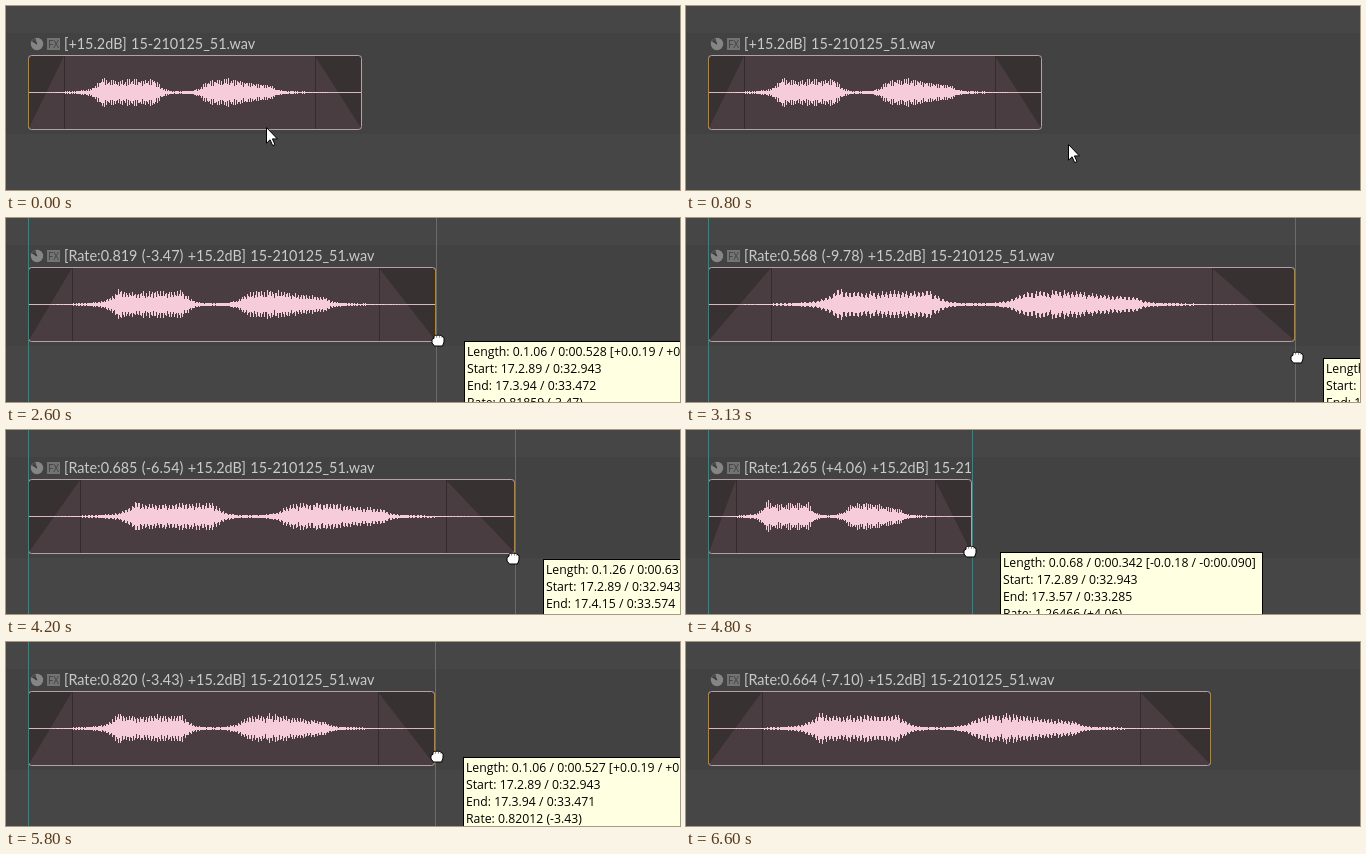
Recreate the animation shown at these times as an HTML page. Size 674x184 px, loop 6.79 s.

```html
<!DOCTYPE html>
<html lang="en">
<head>
<meta charset="utf-8">
<title>Stretching an audio item</title>
<style>
  html, body { margin: 0; width: 100%; height: 100%; overflow: hidden; background: #464646; }
  svg { display: block; width: 674px; height: 184px; }
  .crisp { shape-rendering: crispEdges; }
  #title { font: 14.4px Lato, sans-serif; word-spacing: .7px; fill: #cacaca; }
  #tip text { font: 12.25px "Open Sans", "Noto Sans", sans-serif; fill: #000; white-space: pre; }
  #fx { font: 10px "Open Sans", sans-serif; fill: #414141; }
</style>
</head>
<body>
<svg viewBox="0 0 674 184">
  <defs>
    <clipPath id="inItem"><rect id="clip" x="22" y="28" height="97"/></clipPath>
  </defs>
  <rect width="674" height="184" fill="#464646"/>
  <rect y="27" width="674" height="101" fill="#424242"/>

  <path id="dimGuide" class="crisp" stroke="#6b6b6b"/>

  <g clip-path="url(#inItem)">
    <circle cx="31" cy="38" r="6.2" fill="#858585"/>
    <path d="M31 38L25.6 35.2A6.2 6.2 0 0 1 29.5 32Z" fill="#4a4a4a"/>
    <path d="M31 38L27 35" stroke="#3a3a3a" stroke-width="1.3"/>
    <rect x="41" y="32" width="13" height="12" fill="#737373"/>
    <text id="fx" x="42" y="41.7">FX</text>
    <text id="title" x="58" y="43"></text>
  </g>

  <rect id="body" x="22.5" y="49.5" height="74" rx="3" fill="#493d41"/>
  <path id="fades" fill="#373132"/>
  <path id="fadeLines" class="crisp" stroke="#332c2e"/>
  <path id="axis" class="crisp" stroke="#d9b6c2"/>
  <path id="wave" class="crisp" stroke="#f6cbda"/>
  <rect id="frame" x="22.5" y="49.5" height="74" rx="3" fill="none" stroke="#b3a1a6"/>
  <path class="crisp" stroke="#c08412" d="M22.5 52V122"/>
  <path id="rightEdge" class="crisp" stroke="#c08412"/>

  <path id="guides" class="crisp" stroke="#1a918d"/>

  <g id="tip">
    <rect class="crisp" x=".5" y=".5" fill="#ffffe1" stroke="#000"/>
    <text x="3" y="14.5"></text>
    <text x="3" y="31.5"></text>
    <text x="3" y="48.5"></text>
    <text x="3" y="65.5"></text>
  </g>

  <path id="arrow" fill="#fff" stroke="#000" d="M.5 .5V16.2L4.1 12.8L6.7 18.6L9 17.6L6.4 11.9H11.4Z"/>
  <path id="resize" fill="#fff" stroke="#000" d="M-6 0L-2.5 -4V-1.5H2.5V-4L6 0L2.5 4V1.5H-2.5V4Z"/>
  <g id="fist">
    <path fill="#fff" stroke="#000" d="M-3.5 5.5L-6 2.5V-1L-4 -2.2V-4.2Q-3 -6 -1.4 -4.8Q0 -6.3 1.5 -4.8Q3 -5.8 4 -4.2Q6 -4.2 6 -2V1.5L4.5 5.5Z"/>
    <path fill="none" stroke="#666" stroke-width=".7" d="M-1.4 -4.4V-2.8M1.5 -4.4V-2.8M4 -3.8V-2.4"/>
  </g>
</svg>
<script>
const LOOP = 6790, STEP = 200 / 3;
const LEFT = 22, BASE_W = 333.87, BASE_EDGE = LEFT + BASE_W;
const START = 32.9433, LENGTH = 0.4329;
const GRAB = 1800, RELEASE = 6600, MID = 86.5;

const $ = id => document.getElementById(id);
const set = (id, attrs) => { for (const k in attrs) $(id).setAttribute(k, attrs[k]); };
const show = (id, on) => set(id, { visibility: on ? 'visible' : 'hidden' });
const move = (id, x, y) => set(id, { transform: `translate(${x} ${y})` });

// Keys are [time, value]
const EDGE = [[2267, BASE_EDGE], [3133, 609.26], [3533, 640], [3667, 640], [4200, 509.1],
  [4800, 286], [5133, 236], [5333, 236], [5800, 429.1], [6533, 525.1]];
const HAND_Y = [[2267, 114], [3133, 139], [3533, 140], [3667, 140], [4200, 128],
  [4800, 121], [5133, 118], [5333, 118], [5800, 114], [6533, 114]];
const POINTER_X = [[0, 260], [733, 383], [1333, 356]];
const POINTER_Y = [[0, 121], [733, 139], [1333, 114]];

// Half height of the waveform along the unstretched item
const ENV = [[0, 0], [20, .6], [36, 1.2], [52, 2.2], [62, 4], [68, 9], [75, 18], [81, 12.5],
  [95, 14], [105, 16], [118, 14], [126, 15], [131, 9], [136, 4], [144, 2], [162, 2],
  [170, 4.5], [176, 10], [183, 16], [192, 14], [200, 16], [212, 13.5], [222, 10.5],
  [232, 10], [243, 8.5], [247, 4.5], [254, 2.2], [270, 1.4], [285, .8], [334, .2]];

const slope = (a, b) => (b[1] - a[1]) / (b[0] - a[0]);

function tangent(keys, i) {
  if (i === 0 || i === keys.length - 1) return 0;
  const a = slope(keys[i - 1], keys[i]), b = slope(keys[i], keys[i + 1]);
  return a * b <= 0 ? 0 : 2 * a * b / (a + b);
}

function segment(keys, t) {
  let i = 0;
  while (i < keys.length - 2 && t >= keys[i + 1][0]) i++;
  return i;
}

function ease(keys, t) {
  const last = keys[keys.length - 1];
  if (t <= keys[0][0]) return keys[0][1];
  if (t >= last[0]) return last[1];
  const i = segment(keys, t), [t0, a] = keys[i], [t1, b] = keys[i + 1];
  const h = t1 - t0, u = (t - t0) / h, v = 1 - u;
  return a * (1 + 2 * u) * v * v + b * u * u * (3 - 2 * u)
    + h * u * v * (tangent(keys, i) * v - tangent(keys, i + 1) * u);
}

function linear(keys, x) {
  const i = segment(keys, x);
  return keys[i][1] + slope(keys[i], keys[i + 1]) * (x - keys[i][0]);
}

const noise = n => { const s = Math.sin(n * 127.1) * 43758.5453; return s - Math.floor(s); };
const pad = (n, len) => String(n).padStart(len, '0');
const signed = n => (n < 0 ? '-' : '+') + Math.abs(n).toFixed(2);

// Measure.beat.hundredths at 120 bpm; base is 1 for positions, 0 for lengths
function beats(sec, base) {
  const c = Math.round(sec * 200);
  return `${Math.floor(c / 400) + base}.${Math.floor(c % 400 / 100) + base}.${pad(c % 100, 2)}`;
}

function clock(sec) {
  const ms = Math.floor(sec * 1000);
  return `0:${pad(Math.floor(ms / 1000), 2)}.${pad(ms % 1000, 3)}`;
}

const both = (sec, base) => `${beats(sec, base)} / ${clock(sec)}`;

function wavePath(width) {
  const scale = width / BASE_W;
  let d = '';
  for (let x = 18 * scale | 0; x < width - 2; x++) {
    const p = x / scale, cycle = p / 2.3;
    const ripple = .8 + .2 * Math.cos(cycle * 2 * Math.PI) - .22 * noise(Math.floor(cycle));
    const a = linear(ENV, p) * ripple;
    if (a > .5) d += `M${LEFT + x + .5} ${(MID - a).toFixed(1)}V${(MID + a * .98).toFixed(1)}`;
  }
  return d;
}

function drawItem(edge, rate, stretched, dragging) {
  const right = Math.round(edge), width = right - LEFT;
  const inX = Math.round(LEFT + width * 36 / 334), outX = Math.round(right - width * 47 / 334);
  const pitch = signed(12 * Math.log2(rate));
  $('title').textContent =
    `[${stretched ? `Rate:${rate.toFixed(3)} (${pitch}) ` : ''}+15.2dB] 15-210125_51.wav`;
  set('clip', { width });
  set('body', { width: width - 1 });
  set('frame', { width: width - 1 });
  set('fades', { d: `M23 122V52L25 50H${inX}ZM${outX} 50H${right - 3}L${right - 1} 52V122Z` });
  set('fadeLines', { d: `M${inX + .5} 50V123M${outX + .5} 50V123` });
  set('axis', { d: `M23 ${MID}H${right - 1}` });
  set('wave', { d: wavePath(width) });
  set('rightEdge', { d: `M${right - .5} 52V122` });
  show('rightEdge', right > 356);

  const line = `M${right + .5} 0V184`, teal = right <= 356;
  set('guides', { d: 'M22.5 0V184' + (teal ? line : '') });
  set('dimGuide', { d: line });
  show('guides', dragging);
  show('dimGuide', dragging && !teal);
}

function drawTip(edge, y, rate, stretched) {
  const len = LENGTH / rate, diff = len - LENGTH, sign = diff < 0 ? '-' : '+';
  const size = Math.abs(diff);
  const lines = [
    'Length: ' + both(len, 0)
      + (stretched ? ` [${sign}${beats(size, 0)} / ${sign}${clock(size)}]` : ''),
    'Start: ' + both(START, 1),
    'End: ' + both(START + len, 1),
    stretched ? `Rate: ${rate.toFixed(5)} (${signed(12 * Math.log2(rate))})` : ''
  ];
  let widest = 0;
  $('tip').querySelectorAll('text').forEach((el, i) => {
    el.textContent = lines[i];
    widest = Math.max(widest, el.getComputedTextLength());
  });
  const box = $('tip').querySelector('rect');
  box.setAttribute('width', Math.round(widest) + 9);
  box.setAttribute('height', stretched ? 69 : 52);
  move('tip', Math.round(edge) + 28, y + 1);
}

function draw(t) {
  const edge = ease(EDGE, t), rate = BASE_W / (edge - LEFT);
  const stretched = Math.abs(edge - BASE_EDGE) > .3;
  const dragging = t >= GRAB - 5 && t < RELEASE - 5;
  drawItem(edge, rate, stretched, dragging);

  const y = Math.round(ease(HAND_Y, t));
  show('tip', dragging);
  if (dragging) drawTip(edge, y, rate, stretched);

  const speed = ease(EDGE, t + 20) - ease(EDGE, t - 20);
  const lead = Math.abs(speed) > 1 ? 2 * Math.sign(speed) : 0;
  const px = Math.round(ease(POINTER_X, t)), py = Math.round(ease(POINTER_Y, t));
  show('arrow', t < 1260);
  show('resize', t >= 1260 && t < 1460);
  show('fist', t >= 1460 && t < RELEASE - 5);
  move('arrow', px, py);
  move('resize', px + .5, py + .5);
  move('fist', Math.round(edge) + lead, y + .5);
}

let shown = -1;
function tick(now) {
  const step = Math.floor((now % LOOP + 5) / STEP);
  if (step !== shown) draw((shown = step) * STEP);
  requestAnimationFrame(tick);
}
draw(0);
requestAnimationFrame(tick);
</script>
</body>
</html>
```
